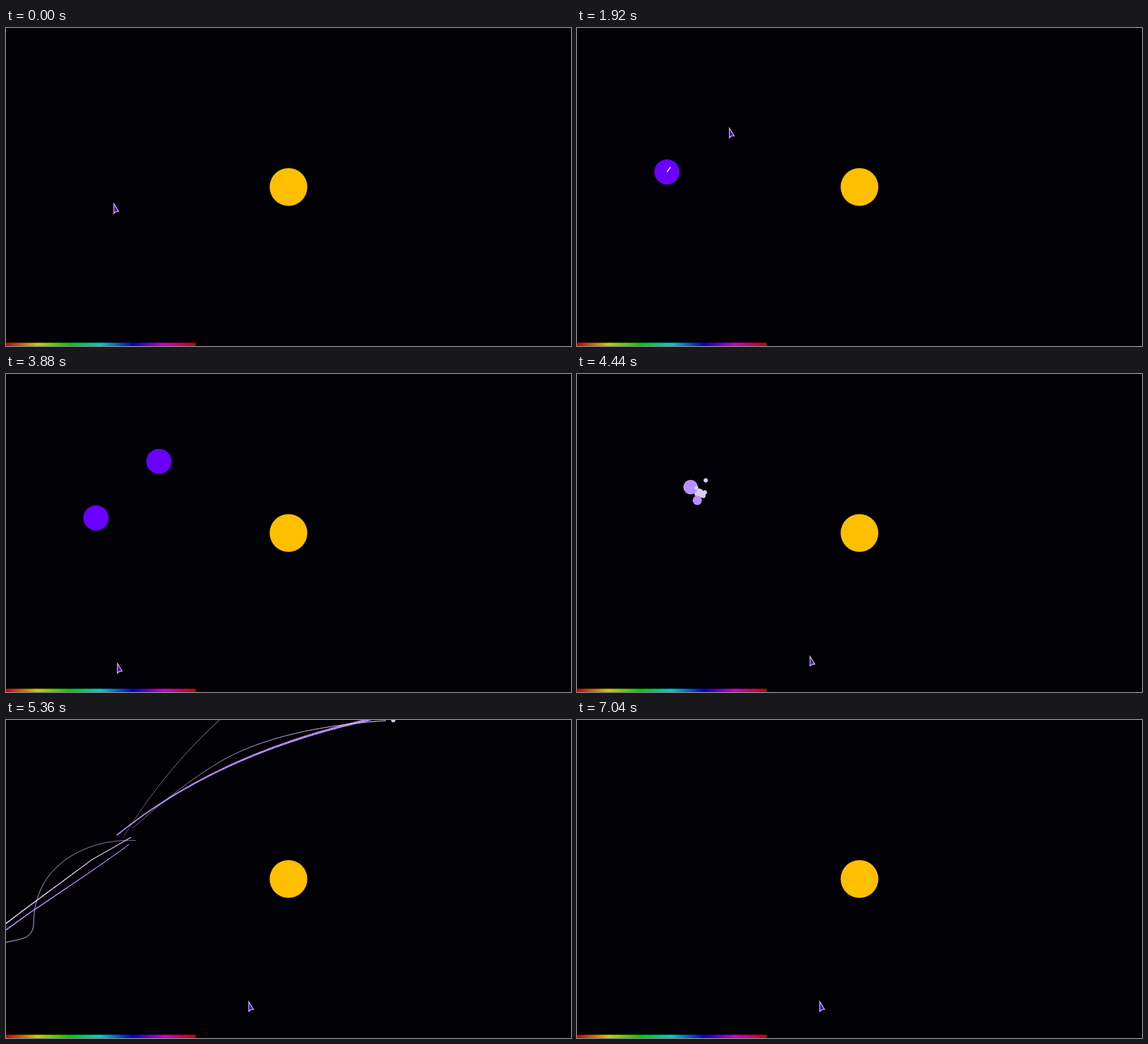
Animation, 800 px wide and 450 px high, one loop 7080 ms. Source, as an HTML page with a canvas:

```html
<!DOCTYPE html>
<html lang="en">
<head>
<meta charset="utf-8">
<title>Planet collision</title>
<style>
  html, body { margin: 0; width: 100%; height: 100%; overflow: hidden; background: #010005; }
  canvas { display: block; }
</style>
</head>
<body>
<canvas id="stage" width="800" height="450"></canvas>
<script>
const ctx = document.getElementById('stage').getContext('2d');
const LOOP = 7080, STEP = 40;
const LAUNCH = 3940, CRASH = 4430, MARK = 4800, ABSORBED = 4860;
const TRAIL_LIFE = 1600, TRAIL_GAP = 7, TRAIL_STEP = 4;
const VIOLET = '#6a00ff', LILAC = '#b88fff', PALE = '#dccbff';

const clamp = v => Math.max(0, Math.min(1, v));
const ease = u => u * u * (3 - 2 * u);
const mix = (a, b, u) => a + (b - a) * u;
const span = (t, from, to) => clamp((t - from) / (to - from));

// Each planet is placed, then flung by pulling the pointer the other way.
const planets = [
  { x: 127.4, y: 203.7, placed: 600, pulled: 720, released: 1360, dx: -50, dy: 68 },
  { x: 216.6, y: 123.7, placed: 2220, pulled: 2240, released: 2800, dx: 60, dy: -66 }
];
const middle = { x: (planets[0].x + planets[1].x) / 2, y: (planets[0].y + planets[1].y) / 2 };

const moveTo = (from, to, x, y) => ({ from, to, x, y });
const pullOf = p => moveTo(p.pulled, p.released, p.x + p.dx, p.y + p.dy);
const pointerMoves = [
  moveTo(0, 480, planets[0].x, planets[0].y),
  pullOf(planets[0]),
  moveTo(1480, 1920, 215, 141),
  moveTo(1920, 2120, planets[1].x, planets[1].y),
  pullOf(planets[1]),
  moveTo(2960, 3840, 157, 409),
  moveTo(4040, 4520, 343, 398)
];

// A piece covers its near path from CRASH to MARK and goes on along far at the same speed.
function makePiece(r, color, near, far, absorbed = false) {
  const path = document.createElementNS('http://www.w3.org/2000/svg', 'path');
  path.setAttribute('d', near);
  const speed = path.getTotalLength() / (MARK - CRASH);
  path.setAttribute('d', near + far);
  const length = path.getTotalLength();
  const points = [];
  for (let d = 0; d < length; d += TRAIL_STEP) points.push(path.getPointAtLength(d));
  return { r, color, path, speed, length, points, absorbed };
}

const pieces = [
  makePiece(3, PALE, 'M186 168 Q110 158 11.5 220', 'L-4 230', true),
  makePiece(3.5, PALE, 'M184 170 Q80 165 5 262', 'L-4 274', true),
  makePiece(3.5, PALE, 'M184 170.5 C115 167 40 205 39.2 286', 'C39 312 20 309 -5 316'),
  makePiece(3.5, PALE, 'M184 171.5 C100 180 62 210 60 250 S60 283 50 283.5', 'L20 292', true),
  makePiece(6.6, PALE, 'M177 166 L122 197.5 L24.3 269.5', 'L-8 294'),
  makePiece(6.6, LILAC, 'M174 176 Q150 195 33 273.3', 'L-8 303'),
  makePiece(10.3, LILAC, 'M157 163 Q225 108 309.5 68', 'Q401 25 512 0 L545 -8'),
  makePiece(3, PALE, 'M179 153.5 Q252 88 309.3 55.5', 'Q394 9 552 0'),
  makePiece(2.7, PALE, 'M166 166 Q225 70 304.5 -2', 'L318 -14')
];

function disc(x, y, r, color) {
  ctx.fillStyle = color;
  ctx.beginPath();
  ctx.arc(x, y, r, 0, Math.PI * 2);
  ctx.fill();
}

function line(a, b, width, color) {
  ctx.strokeStyle = color;
  ctx.lineWidth = width;
  ctx.beginPath();
  ctx.moveTo(a.x, a.y);
  ctx.lineTo(b.x, b.y);
  ctx.stroke();
}

// The trail thins with age until it is gone.
function drawPiece({ r, color, path, speed, length, points, absorbed }, t) {
  if (t < CRASH || (absorbed && t >= ABSORBED)) return;
  const gone = (t - CRASH) * speed;
  const flying = gone < length;
  const reach = flying ? gone - TRAIL_GAP : length;
  for (let i = 1; i < points.length && i * TRAIL_STEP <= reach; i++) {
    const age = (gone - i * TRAIL_STEP) / speed;
    const width = r * 0.37 * (1 - age / TRAIL_LIFE);
    if (width > 0) line(points[i - 1], points[i], width, color);
  }
  if (flying) {
    const head = path.getPointAtLength(gone);
    disc(head.x, head.y, r, color);
  }
}

function drawPlanet(p, t) {
  if (t < p.placed || t >= CRASH) return;
  const u = span(t, LAUNCH, CRASH), go = 0.7 * mix(u, u * u, 0.55);
  const at = { x: mix(p.x, middle.x, go), y: mix(p.y, middle.y, go) };
  if (go) line(p, at, 5, VIOLET);
  disc(at.x, at.y, 17.8, VIOLET);
  if (t > p.pulled && t < 3720) {
    const k = -0.1 * ease(span(t, p.pulled, p.released));
    line(p, { x: p.x + p.dx * k, y: p.y + p.dy * k }, 1.4, '#fff');
  }
}

function drawPointer(t) {
  let x = 152, y = 248;
  for (const m of pointerMoves) {
    const u = ease(span(t, m.from, m.to));
    x = mix(x, m.x, u);
    y = mix(y, m.y, u);
  }
  ctx.save();
  ctx.translate(x + 0.8, y + 0.8);
  ctx.beginPath();
  [[0, 0], [0, 13.6], [2.8, 11], [6.7, 11]].forEach(p => ctx.lineTo(...p));
  ctx.closePath();
  ctx.fillStyle = '#4800c4';
  ctx.fill();
  ctx.strokeStyle = '#d9cbee';
  ctx.lineWidth = 1.1;
  ctx.stroke();
  ctx.restore();
}

const rainbow = ctx.createLinearGradient(0, 0, 268.5, 0);
for (let i = 0; i <= 24; i++) rainbow.addColorStop(i / 24, `hsl(${i * 15}, 100%, 40%)`);

function draw(t) {
  ctx.fillStyle = '#010005';
  ctx.fillRect(0, 0, 800, 450);
  disc(400, 225, 26.7, '#fdbf00');
  planets.forEach(p => drawPlanet(p, t));
  pieces.forEach(p => drawPiece(p, t));
  ctx.fillStyle = rainbow;
  ctx.fillRect(0, 445.4, 268.5, 4.6);
  drawPointer(t);
}

const start = performance.now();
function tick() {
  const t = (performance.now() - start) % LOOP;
  draw(Math.floor(t / STEP) * STEP);
  requestAnimationFrame(tick);
}
tick();
</script>
</body>
</html>
```
